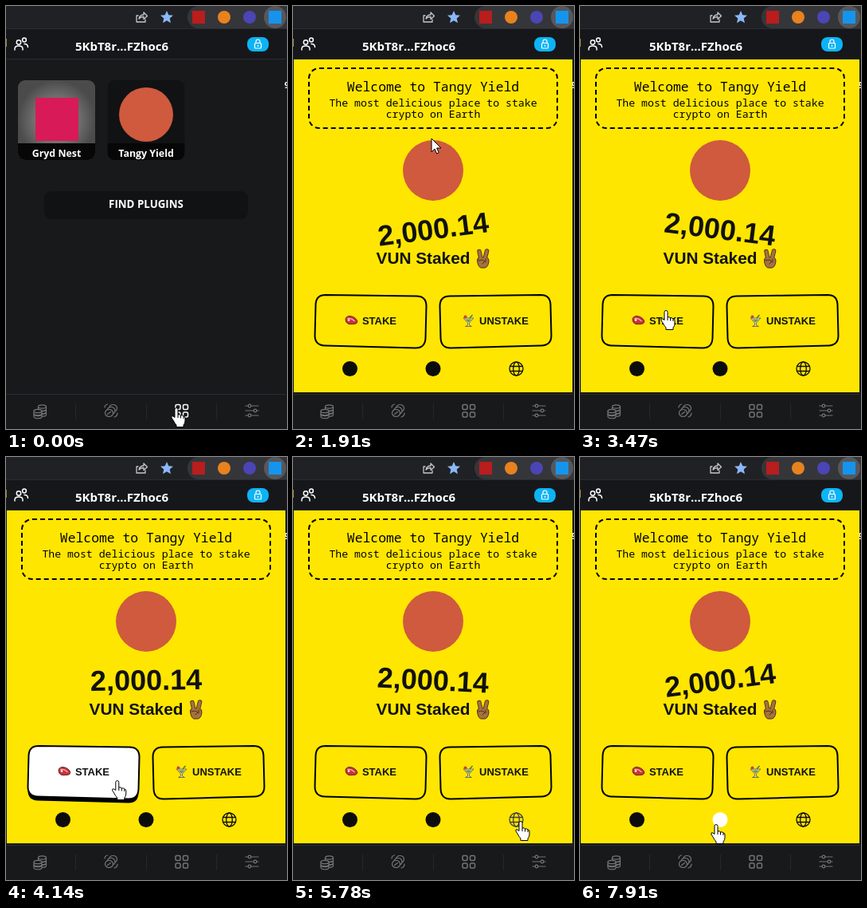
Animation, 353 px wide and 530 px high, one loop 7990 ms. Source, as an HTML page:

```html
<!DOCTYPE html>
<html lang="en">
<head>
<meta charset="utf-8">
<title>Wallet plugins</title>
<style>
  html, body { margin: 0; width: 100%; height: 100%; overflow: hidden; background: #18191b; }
  svg { display: block; width: 100%; height: 100%; }
  text { text-anchor: middle; }
  .ui { font-family: "Open Sans", "Noto Sans", sans-serif; font-weight: 700; fill: #fff; }
  .mono { font-family: "Noto Sans Mono", "DejaVu Sans Mono", monospace; font-weight: 500; }
  .sans { font-family: "Liberation Sans", Arial, sans-serif; font-weight: 700; }
  .line { fill: none; stroke-linecap: round; stroke-linejoin: round; }
  .dashes { box-sizing: border-box; height: 77px; border: 2px dashed #000; border-radius: 14px; }
</style>
</head>
<body>
<svg viewBox="0 0 353 530">
  <defs>
    <radialGradient id="glow">
      <stop offset="0" stop-color="#a2a2a2"/><stop offset="1" stop-color="#4b4b4c"/>
    </radialGradient>
    <clipPath id="round"><rect width="97" height="100" rx="9"/></clipPath>
    <path id="frame" d="M41 362L155 363.500Q167.500 363.500 167.500 376L166.500 416Q166 428.500 154 428.500L40 425.500Q27.500 425 27.500 413L28.500 374Q29 362 41 362Z"/>
    <g id="coin"><path d="M-5 0v3c0 3 10 3 10 0v-3"/><ellipse rx="5" ry="2.200"/></g>
  </defs>

  <!-- browser bar -->
  <rect width="353" height="530" fill="#18191b"/>
  <rect width="353" height="29" fill="#202124"/>
  <path d="M353 0H242a14 14 0 0 0 0 28H353Z" fill="#35363a"/>
  <g class="line" stroke="#c4c7c9" stroke-width="1.300">
    <path d="M166 12h-2v8h11v-3M167 16q1-5 6-5v-3l4.500 4.500-4.500 4v-3q-4 0-6 2.500Z"/>
  </g>
  <path d="M202 6l2.300 5.300 5.700.5-4.300 3.800 1.300 5.600-5-3-5 3 1.300-5.600-4.300-3.800 5.700-.5Z" fill="#8ab8f8"/>
  <rect x="234" y="6" width="16" height="16" fill="#b91d1d"/>
  <circle cx="274" cy="14" r="8" fill="#e8821e"/>
  <circle cx="306" cy="14" r="8" fill="#4b45b5"/>
  <circle cx="338" cy="14" r="14" fill="#56585d"/>
  <rect x="330" y="6" width="16" height="16" fill="#1594ee"/>

  <!-- header -->
  <rect x="1" y="29" width="350" height="37" fill="#16171a"/>
  <path d="M0 28.500H353M1 66.500H351" stroke="#2b2c30"/>
  <rect y="41" width="1" height="10" fill="#a08a28"/>
  <text class="ui" x="353" y="103" font-size="11">9</text>
  <g class="line" stroke="#fff" stroke-width="1.500">
    <circle cx="16" cy="45.500" r="2.700"/><path d="M11 55v-1.500q0-3.500 5-3.500t5 3.500V55"/>
    <circle cx="23" cy="42.500" r="2.400"/><path d="M23 47.500q4.500 0 4.500 4"/>
  </g>
  <text class="ui" x="145.500" y="55.500" font-size="15">5KbT8r...FZhoc6</text>
  <rect x="303" y="39" width="27" height="18" rx="8" fill="#0db4f5"/>
  <g class="line" stroke="#fff" stroke-width="1.200">
    <rect x="312.500" y="46.500" width="8" height="6.500" rx="1"/><path d="M314 46.500v-2a2.500 2.500 0 0 1 5 0v2M316.500 49v1.500"/>
  </g>

  <!-- plugin list -->
  <g id="list">
    <g transform="translate(15 93)" clip-path="url(#round)">
      <rect width="97" height="100" fill="url(#glow)"/>
      <rect x="22" y="22" width="54" height="54" fill="#d81a58"/>
      <rect y="79" width="97" height="21" fill="#070707"/>
      <text class="ui" x="48.500" y="95.500" font-size="12.400">Gryd Nest</text>
    </g>
    <g id="tile">
      <g transform="translate(127.500 93)" clip-path="url(#round)">
        <rect width="97" height="100" fill="#111214"/>
        <circle cx="48.500" cy="43" r="34" fill="#cf5a3e"/>
        <rect y="79" width="97" height="21" fill="#070707"/>
        <text class="ui" x="48.500" y="95.500" font-size="12.400">Tangy Yield</text>
      </g>
    </g>
    <rect x="48" y="232" width="256" height="35" rx="9" fill="#111214"/>
    <text class="ui" x="176" y="253" font-size="13.300">FIND PLUGINS</text>
  </g>

  <!-- staking page -->
  <g id="page">
    <rect x="1" y="67" width="350" height="417" fill="#ffe600"/>
    <foreignObject x="19" y="77" width="314" height="77"><div class="dashes"></div></foreignObject>
    <g class="mono">
      <text x="176" y="107" font-size="16.400">Welcome to Tangy Yield</text>
      <text x="176" y="126" font-size="13.200">The most delicious place to stake</text>
      <text x="176" y="139.500" font-size="13.200">crypto on Earth</text>
    </g>
    <circle cx="176" cy="206" r="38" fill="#cf5a3e"/>
    <g class="sans">
      <text id="total" x="176" y="292" font-size="36" fill="#111">2,000.14</text>
      <text x="163.500" y="323" font-size="20.800" fill="#111">VUN Staked</text>
    </g>
    <g class="line">
      <path d="M236 317l-2-9.500M241 317l2.500-10" stroke="#4a3017" stroke-width="5.500"/>
      <path d="M231.500 318q0-3 4-3h7.500q3.500 1 3 5-1 7.500-5 8h-5.500q-4-3-4-10Z" fill="#a5713f" stroke="#4a3017"/>
      <path d="M236 317l-2-9.500M241 317l2.500-10" stroke="#a5713f" stroke-width="3.800"/>
      <path d="M233 319q5-2 8 1l-3 3M242 317v4" stroke="#4a3017"/>
    </g>

    <g class="sans" font-size="13">
      <g id="stake">
        <use class="shade" href="#frame"/><use class="face" href="#frame" stroke="#000" stroke-width="2"/>
      </g>
      <g id="unstake" transform="matrix(-1 0 0 1 352 0)">
        <use class="shade" href="#frame"/><use class="face" href="#frame" stroke="#000" stroke-width="2"/>
      </g>
      <text x="108.500" y="398.500" fill="#111">STAKE</text>
      <text x="265" y="398.500" fill="#111">UNSTAKE</text>
    </g>
    <path d="M66 393q0-4 5-4.500 5 0 8 3.500 3.500 4 0 6-5 1-9 .5-4-1.500-4-5.500Z" fill="#c9333a" stroke="#6d2422"/>
    <path d="M69 391.500q4-1 8 3" class="line" stroke="#f3b5a5" stroke-width="1.300"/>
    <circle cx="70" cy="393.500" r="1.300" fill="#fff"/>
    <path d="M214 391h13l-5.500 6v3l3 1.500h-8l3-1.500v-3Z" fill="#e4d9b0" stroke="#6b5a3a" stroke-width=".8"/>
    <path d="M216.500 392.500h8l-4 4Z" fill="#57a546"/>
    <path d="M222 391l3.500-4" stroke="#3b7a35" stroke-width="1.300"/><circle cx="216.500" cy="389.500" r="2" fill="#c8414a"/>

    <circle cx="71.500" cy="454.500" r="9.500" fill="#0c0c0c"/>
    <circle id="social" cx="176" cy="454.500" r="9.500"/>
    <g id="globe" class="line" stroke-width="1.300">
      <circle cx="280.500" cy="454.500" r="8.500"/><ellipse cx="280.500" cy="454.500" rx="3.800" ry="8.500"/>
      <path d="M273 451.500h15M273 457.500h15"/>
    </g>
  </g>

  <!-- bottom tabs -->
  <rect x="1" y="484" width="350" height="46" fill="#18191b"/>
  <path d="M1 486.500H351" stroke="#2b2c30"/>
  <path d="M87.500 498v20M176.500 498v20M264.500 498v20" stroke="#26272a"/>
  <g class="line" stroke="#747577" stroke-width="1.200">
    <g fill="#18191b">
      <use href="#coin" x="45.500" y="509"/><use href="#coin" x="45.500" y="505.500"/><use href="#coin" x="45.500" y="502"/>
      <use href="#coin" x="40" y="511.500"/><use href="#coin" x="40" y="507.500"/>
      <ellipse cx="134.500" cy="504" rx="5" ry="4.500"/><ellipse cx="132" cy="507" rx="5" ry="4.500"/><ellipse cx="129.500" cy="510" rx="5" ry="4.500"/>
    </g>
    <path d="M127.500 511.500l4-3M124 503q0-3 3.500-4M140 510q0 4-4 5"/>
    <g id="grid" stroke-width="1.500">
      <rect x="213" y="499.500" width="6" height="6" rx="1.500"/><rect x="222.500" y="499.500" width="6" height="6" rx="1.500"/>
      <rect x="213" y="509" width="6" height="6" rx="1.500"/><rect x="222.500" y="509" width="6" height="6" rx="1.500"/>
    </g>
    <path d="M301 501h16M301 507h16M301 513h16"/>
    <g fill="#18191b"><circle cx="306" cy="501" r="1.800"/><circle cx="313" cy="507" r="1.800"/><circle cx="306" cy="513" r="1.800"/></g>
  </g>

  <g id="pointer" fill="#fff" stroke="#000" stroke-linejoin="round">
    <path id="arrow" d="M0 0V17l4-4 2.600 6 2.600-1.200-2.600-5.800h5.400Z"/>
    <g id="hand">
      <path d="M-2 1.500a2 2 0 0 1 4 0v6.500q3-1 3.500 1 3-.8 3.500 1 2 0 2 2v4q0 3-2 5v2.500h-9v-2.500q-2-2-4-6-3-3.500-2-5 1.500-1 4 1.500Z"/>
      <path d="M2 8v4M5.500 9v3.500M9 10v3" fill="none"/>
    </g>
  </g>
</svg>
<script>
const LOOP = 7990, STEP = 80, OPEN = 1830;
const $ = id => document.getElementById(id);
const clamp = v => Math.max(0, Math.min(1, v));
const mix = (a, b, k) => a + (b - a) * k;
const grey = v => { v = Math.round(v); return `rgb(${v},${v},${v})`; };

// the picture updates in bursts of ten steps
const bursts = [580, 1410, 1830, 2660, 3470, 4300, 5110, 5950, 6750, 7570];

// time, x, y of the pointer tip
const path = [
  [580, 214, 504], [830, 203, 400], [1080, 182, 225], [1330, 174, 166],
  [2660, 174, 166], [2980, 172, 172], [3230, 158, 240], [3390, 130, 328],
  [3470, 108, 382], [3790, 110, 386], [4220, 150, 413], [4700, 226, 415],
  [5030, 228, 415], [5750, 286, 457], [5870, 287, 463], [5950, 287, 463],
  [6670, 213, 470], [6750, 213, 471], [7490, 171, 461]
];
const tileScale = [[1160, 1], [1250, 1.06], [1330, 1.04], [1410, 1.02], [1510, 1]];
const handTimes = [[0, 660], [1200, OPEN], [3440, 4335], [4435, 5250], [5720, 6040], [7400, LOOP]];

function snap(t) {
  const start = bursts.filter(b => b <= t).pop();
  return start === undefined ? 0 : start + Math.min(9, Math.floor((t - start) / STEP)) * STEP;
}

function track(rows, t) {
  const i = rows.findIndex(r => r[0] > t);
  if (i < 0) return rows[rows.length - 1].slice(1);
  if (i === 0) return rows[0].slice(1);
  const a = rows[i - 1], b = rows[i], k = (t - a[0]) / (b[0] - a[0]);
  return a.slice(1).map((v, n) => mix(v, b[n + 1], k));
}

const hover = (t, on, off, fade) => clamp((t - on) / fade) - clamp((t - off) / fade);

function press(id, k) {
  const [shade, face] = $(id).children;
  shade.setAttribute("transform", `translate(0 ${5 * k})`);
  shade.setAttribute("opacity", k > 0 ? 1 : 0);
  face.setAttribute("fill", `rgb(255,${mix(230, 255, k)},${mix(0, 255, k)})`);
}

function draw(now) {
  const t = snap(now % LOOP);
  const opened = t >= OPEN;
  $("list").style.display = opened ? "none" : "";
  $("page").style.display = opened ? "" : "none";

  const [s] = track(tileScale, t);
  $("tile").setAttribute("transform", `translate(176 143) scale(${s}) translate(-176 -143)`);
  $("grid").setAttribute("stroke", grey(mix(255, 116, clamp((t - 660) / 160))));

  const tilt = -7.5 * Math.cos((t - 1810) / 3000 * 2 * Math.PI);
  $("total").setAttribute("transform", `rotate(${tilt} 176 279)`);

  press("stake", hover(t, 3470, 4300, 160));
  press("unstake", hover(t, 4435, 5250, 160));
  $("globe").setAttribute("stroke", grey(mix(12, 255, hover(t, 5700, 6030, 240))));
  $("social").setAttribute("fill", grey(mix(12, 255, hover(t, 7480, LOOP, 300))));

  const [x, y] = track(path, t);
  const hand = handTimes.some(([a, b]) => t >= a && t < b);
  $("pointer").setAttribute("transform", `translate(${x} ${y})`);
  $("hand").style.display = hand ? "" : "none";
  $("arrow").style.display = hand ? "none" : "";
}

let first;
function tick(now) {
  first ??= now;
  draw(now - first);
  requestAnimationFrame(tick);
}
draw(0);
requestAnimationFrame(tick);
</script>
</body>
</html>
```
